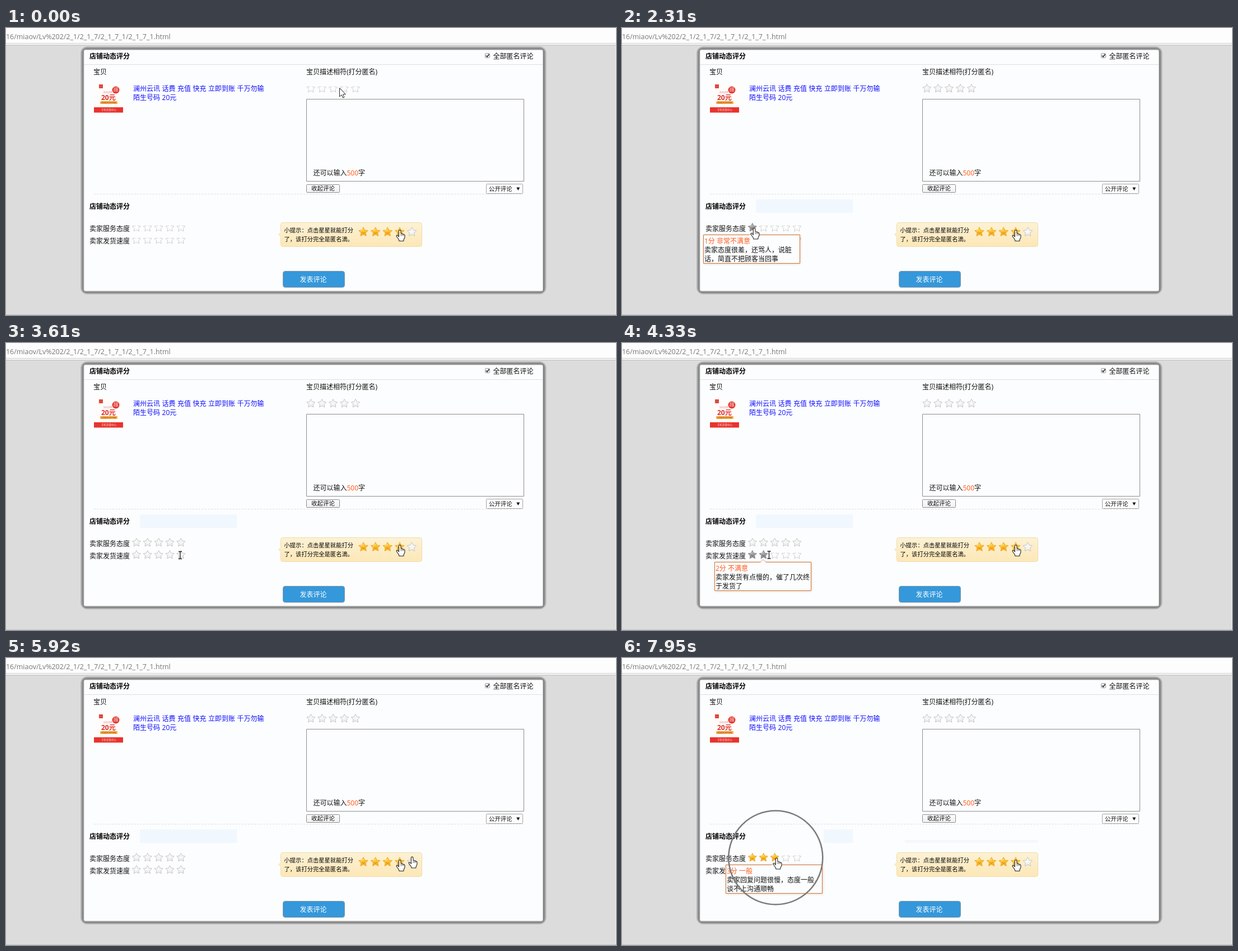
An HTML page with a canvas that plays this animation: 1089 px wide and 514 px high, repeating every 8 s.

```html
<!DOCTYPE html>
<html lang="zh-CN">
<head>
<meta charset="utf-8">
<title>店铺动态评分</title>
<style>
html, body { margin: 0; width: 100%; height: 100%; overflow: hidden; background: #dcdcdc; }
canvas { display: block; }
</style>
</head>
<body>
<canvas id="stage" width="1089" height="514"></canvas>
<script>
const ctx = document.getElementById('stage').getContext('2d');
const LOOP = 8000, TICK = 130;
const PANEL = '#fcfdfe', INK = '#111', ORANGE = '#ff5a1a';
const FONT = '"Open Sans", "Noto Sans CJK SC", "Noto Sans CJK", sans-serif';

const ROWS = [
  { x: 544.3, y: 108, tips: {
    4: '质量不错，与卖家描述的基本一|致，还是挺满意的',
    5: '质量非常好，与卖家描述的完全|一致，非常满意' } },
  { x: 232.8, y: 357, tips: {
    1: '卖家态度很差，还骂人，说脏|话，简直不把顾客当回事',
    2: '卖家有点不耐烦，承诺的服务也|兑现不了',
    3: '卖家回复问题很慢，态度一般，|谈不上沟通顺畅',
    4: '卖家服务挺好的，沟通挺顺畅|的，总体满意',
    5: '卖家的服务太棒了，考虑非常周|到，完全超出期望值' } },
  { x: 232.8, y: 379, tips: {
    1: '再三提醒下，卖家超过10天才发|货，耽误我的时间',
    2: '卖家发货有点慢的，催了几次终|于发货了',
    3: '卖家发货速度一般，提醒后才发|货的',
    4: '卖家发货挺及时的，运费收取很|合理',
    5: '卖家发货速度非常快，包装非常|仔细、严实' } }
];
const GRADES = ['', '非常不满意', '不满意', '一般', '满意', '非常满意'];

// time, row, score
const RATINGS = [
  [0, 0, 0], [130, 0, 4], [270, 0, 5], [550, 0, 0],
  [2180, 1, 1], [2440, 1, 0], [2570, 1, 2], [2700, 1, 0], [2830, 1, 3], [2950, 1, 0],
  [3210, 1, 5], [3610, 1, 0], [3900, 2, 1], [4200, 2, 0], [4330, 2, 2], [4490, 2, 3],
  [4610, 2, 4], [4870, 2, 5], [5010, 2, 0], [6720, 2, 5], [6870, 1, 4], [7000, 1, 0], [7160, 1, 3]
];

// time, x, y, pointer, glides on to the next stop
const MOVES = [
  [0, 595, 107, arrow], [130, 602, 109, hand], [270, 620, 110, hand], [400, 626, 111, hand],
  [550, 632, 107, arrow], [850, 606, 149, beam], [990, 480, 220, arrow, 1],
  [1250, 243, 361, arrow], [1390, 221.5, 370.5, arrow], [1520, 218, 370, arrow, 1],
  [1920, 217, 355, arrow], [2180, 229, 358, hand], [2310, 236, 358, hand],
  [2440, 243, 360, beam], [2570, 252, 358, hand], [2700, 262, 360, beam],
  [2830, 272, 358, hand], [2950, 283, 360, beam], [3090, 305, 361, beam],
  [3210, 312, 357, hand, 1], [3610, 311, 380, beam], [3770, 262, 382, beam],
  [3900, 230, 380, hand], [4050, 229, 381, hand], [4200, 243, 380, beam],
  [4330, 262.5, 379.5, beam], [4490, 272, 378, hand], [4610, 292, 378, hand],
  [4750, 303, 379, beam], [4870, 312, 378, hand], [5010, 330, 378, arrow, 1],
  [5790, 667, 371, arrow], [5920, 725, 356, hand], [6050, 680, 340, arrow],
  [6180, 590, 328, arrow, 1], [6570, 336, 376, arrow], [6720, 312, 378, hand],
  [6870, 287, 360, hand], [7000, 282, 360, beam], [7160, 276, 358, hand]
];

function text(s, x, y, color = INK, size = 12, weight = 400) {
  ctx.font = `${weight} ${size}px ${FONT}`;
  ctx.fillStyle = color;
  ctx.fillText(s, x, y + size * 0.37);
  return x + ctx.measureText(s).width;
}

function rect(x, y, w, h, color) {
  ctx.fillStyle = color;
  ctx.fillRect(x, y, w, h);
}

function box(x, y, w, h, r, fill, line) {
  ctx.beginPath();
  ctx.roundRect(x, y, w, h, r);
  ctx.fillStyle = fill;
  ctx.fill();
  if (line) stroke(line);
}

function stroke(color, width = 1) {
  ctx.strokeStyle = color;
  ctx.lineWidth = width;
  ctx.stroke();
}

function shade(y0, y1, a, b) {
  const g = ctx.createLinearGradient(0, y0, 0, y1);
  g.addColorStop(0, a);
  g.addColorStop(1, b);
  return g;
}

function shape(points, x, y) {
  ctx.beginPath();
  points.forEach(([px, py]) => ctx.lineTo(x + px, y + py));
  ctx.closePath();
}

function disc(x, y, r, color) {
  ctx.beginPath();
  ctx.arc(x, y, r, 0, Math.PI * 2);
  ctx.fillStyle = color;
  ctx.fill();
}

function star(x, y, look, r = 8) {
  const looks = {
    plain: ['#ffffff', '#ececec', '#c4c4c4'],
    dull: ['#ffffff', '#fafafa', '#cdcdcd'],
    gold: ['#ffd84a', '#f9a512', '#eeaa30'],
    grey: ['#b4b4b4', '#888888', '#8a8a8a']
  };
  const [top, low, line] = looks[look];
  const points = Array.from({ length: 10 }, (_, i) => {
    const a = i * Math.PI / 5 - Math.PI / 2, d = i % 2 ? r * 0.5 : r;
    return [Math.cos(a) * d, Math.sin(a) * d];
  });
  ctx.save();
  if (look === 'dull') {
    ctx.beginPath();
    ctx.rect(x - r, y - 3.5, r * 2, r * 2);
    ctx.clip();
  }
  shape(points, x, y + 0.5);
  ctx.fillStyle = shade(y - r, y + r, top, low);
  ctx.fill();
  stroke(line);
  if (look === 'gold' || look === 'grey') {
    ctx.beginPath();
    ctx.arc(x, y, r * 0.3, 0.3, Math.PI - 0.3);
    stroke(look === 'gold' ? '#c9780c' : '#5c5c5c', 0.9);
    ctx.beginPath();
    ctx.moveTo(x - r * 0.5, y - r * 0.15);
    ctx.lineTo(x, y - r * 0.5);
    stroke(look === 'gold' ? '#fff0a0' : '#d0d0d0');
  }
  ctx.restore();
}

function arrow(x, y) {
  shape([[0, 0], [0, 15.5], [3.6, 12.2], [6, 17.5], [8.4, 16.5], [6.1, 11.4], [10.8, 11.2]], x + 0.5, y + 0.5);
  ctx.fillStyle = '#fff';
  ctx.fill();
  stroke('#222');
}

function beam(x, y) {
  ctx.beginPath();
  for (const s of [-1, 1]) {
    ctx.moveTo(x - 3, y + s * 6.5);
    ctx.lineTo(x + 3, y + s * 6.5);
  }
  ctx.moveTo(x, y - 6.5);
  ctx.lineTo(x, y + 6.5);
  stroke('#222', 1.3);
}

function hand(x, y) {
  shape([[-1.7, 1], [0, 0], [1.7, 1], [2, 6.5], [5, 7.2], [8, 8.4], [9, 10], [8.8, 14], [7, 17.5],
    [6.8, 20], [-1, 20], [-2, 17], [-6, 11.5], [-5.5, 9.8], [-3.6, 10.2], [-1.7, 12.4]], x, y);
  ctx.fillStyle = '#fff';
  ctx.fill();
  stroke('#222', 1.1);
  ctx.beginPath();
  for (const dx of [2, 4.3, 6.6]) {
    ctx.moveTo(x + dx, y + 7.5);
    ctx.lineTo(x + dx, y + 11);
  }
  stroke('#444', 0.8);
}

function frame() {
  rect(0, 0, 1089, 514, '#dcdcdc');
  rect(0, 0, 1089, 31, '#fdfdfd');
  rect(0, 27, 1089, 1, '#c8c8c8');
  rect(0, 30, 1089, 1, '#bdbdbd');
  rect(1088, 31, 1, 483, '#f2f2f2');
  rect(0, 513, 1089, 1, '#c4c4c4');
  text('16/miaov/Lv%202/2_1/2_1_7/2_1_7_1/2_1_7_1.html', 0, 15.5, '#777', 12.44);
  box(133, 33, 831.5, 444, 12, '#b8b8b8');
  box(134.5, 34.5, 828.5, 441, 10, '#9c9c9c');
  box(136.5, 36.5, 824.5, 437.5, 7, '#808080');
  box(138.5, 38.5, 820.5, 433.5, 4, '#c4c4c4');
  box(139.5, 39.5, 818.5, 431, 2, PANEL);
}

function product() {
  rect(157, 99, 52, 53, '#fffdfb');
  rect(166, 101, 7, 7, '#dd4a40');
  disc(196, 111, 6.5, '#e23a34');
  text('充值', 192, 109, '#fff', 4);
  text('优惠', 192, 113, '#fff', 4);
  text('快充话费', 174, 115.5, '#d88', 4);
  text('20元', 170, 125, '#df3029', 12, 700);
  box(168, 131, 31, 5, 1, '#f5b13b');
  text('全国通用 即时到账', 170, 133.5, '#a33', 3.2);
  rect(157, 142, 52, 9.5, '#e8332e');
  text('手机充值中心', 170, 146.5, '#ffd9d0', 4.5);
}

function page(t) {
  frame();
  if (t >= 1250) {
    const left = t >= 7950 ? 360 : 239;
    rect(left, 307, 412 - left, 24, '#f1f7fe');
  }
  if (t >= 6050) rect(505, 326, 238, 5, '#f3f8fe');

  text('店铺动态评分', 149, 51, '#000', 12, 700);
  box(855.5, 45.5, 8, 8, 1, '#f2f2f2', '#999');
  ctx.beginPath();
  ctx.moveTo(857, 49.5);
  ctx.lineTo(859, 51.7);
  ctx.lineTo(862.5, 46.8);
  stroke('#333', 1.7);
  text('全部匿名评论', 869.5, 51);
  rect(140, 65, 818, 1, '#dcdfe0');
  text('宝贝', 156, 78.5);
  text('宝贝描述相符(打分匿名)', 536, 78.5);
  product();
  ctx.wordSpacing = '0.4px';
  text('澜州云讯 话费 充值 快充 立即到账 千万勿输', 227, 108.5, '#1010ff');
  text('陌生号码 20元', 227, 124.5, '#1010ff');
  ctx.wordSpacing = '0px';

  box(536.5, 127.5, 388, 147, 0, PANEL, '#8e8e8e');
  let x = text('还可以输入', 548.5, 259.5);
  x = text('500', x, 259.5, ORANGE);
  text('字', x, 259.5);

  ctx.setLineDash([3, 2.5]);
  ctx.beginPath();
  ctx.moveTo(157, 297.5);
  ctx.lineTo(923, 297.5);
  stroke('#d9dcdd');
  ctx.setLineDash([]);
  box(536.5, 280.5, 59, 14, 1, shade(280, 295, '#fdfdfd', '#f0f0f0'), '#8c8c8c');
  text('收起评论', 545, 287.5, INK, 10.5);
  box(857.5, 279.5, 65, 17, 1, '#fdfdfd', '#a4a4a4');
  text('公开评论', 862, 288, INK, 10.4);
  shape([[-3, -2.5], [3, -2.5], [0, 3]], 914.3, 288);
  ctx.fillStyle = '#111';
  ctx.fill();

  text('店铺动态评分', 149, 319.5, '#000', 12, 700);
  text('卖家服务态度', 149, 359.5);
  text('卖家发货速度', 149, 381.5);
  hint();
  box(494.5, 435.5, 110, 29, 4, '#3498db', '#8d9aa4');
  text('发表评论', 524.5, 450.5, '#fff');
}

function hint() {
  box(490.5, 348.5, 252, 43, 4, shade(348, 392, '#fdf2d6', '#fce7b6'), '#efdcae');
  shape([[0, 0], [5.5, -5], [5.5, 5]], 485.5, 370);
  ctx.fillStyle = '#fcebc3';
  ctx.fill();
  text('小提示：点击星星就能打分', 496.5, 362.5, '#000', 10.3, 500);
  text('了，该打分完全是匿名滴。', 496.5, 378, '#000', 10.3, 500);
  for (let i = 0; i < 5; i++) star(638 + i * 21.6, 365, i < 4 ? 'gold' : 'plain', 8.7);
  hand(703, 361.5);
}

function unlit(t, row, i, hovered) {
  const fresh = row === 0 ? 130 : i ? 1250 : 2180;
  return t < fresh || hovered ? 'dull' : 'plain';
}

function stars(t, active, score) {
  ROWS.forEach((row, r) => {
    const lit = r === active ? score : 0;
    for (let i = 0; i < 5; i++) {
      const look = i < lit ? (lit < 3 ? 'grey' : 'gold') : unlit(t, r, i, lit > 0);
      star(row.x + i * 19.9, row.y, look);
    }
  });
}

function popup(row, score) {
  const cx = Math.floor(row.x + (score - 1) * 19.9), x = cx - 86, y = row.y + 14;
  ctx.save();
  ctx.shadowColor = 'rgba(200, 110, 50, .45)';
  ctx.shadowBlur = 4;
  box(x - 0.5, y - 0.5, 172, 51, 0, PANEL);
  ctx.restore();
  box(x - 0.5, y - 0.5, 172, 51, 0, PANEL, '#c9773f');
  shape([[-5, 0], [0, -5.5], [5, 0]], cx, y);
  ctx.fillStyle = PANEL;
  ctx.fill();
  ctx.beginPath();
  ctx.moveTo(cx - 5, y - 0.5);
  ctx.lineTo(cx, y - 5.5);
  ctx.lineTo(cx + 5, y - 0.5);
  stroke('#d9a17c');
  text(`${score}分 ${GRADES[score]}`, x + 1, y + 10.5, ORANGE);
  row.tips[score].split('|').forEach((s, i) => text(s, x + 1, y + 27 + i * 16));
}

const current = (list, t) => list.findLastIndex(k => k[0] <= t);

function pointer(t) {
  const i = current(MOVES, t), [t0, x, y, draw, glide] = MOVES[i];
  if (!glide) return draw(x, y);
  const [t1, x1, y1] = MOVES[i + 1];
  const p = Math.floor((t - t0) / TICK) * TICK / (t1 - t0);
  draw(x + (x1 - x) * p, y + (y1 - y) * p);
}

function draw(t) {
  const [, row, score] = RATINGS[current(RATINGS, t)];
  ctx.lineJoin = 'round';
  page(t);
  stars(t, row, score);
  if (score) popup(ROWS[row], score);
  if (t >= 7950) {
    ctx.beginPath();
    ctx.arc(274.3, 357.5, 84, 0, Math.PI * 2);
    stroke('#7c7c7c', 2.6);
  }
  pointer(t);
}

const start = performance.now();
function loop() {
  draw((performance.now() - start) % LOOP);
  requestAnimationFrame(loop);
}
loop();
</script>
</body>
</html>
```
